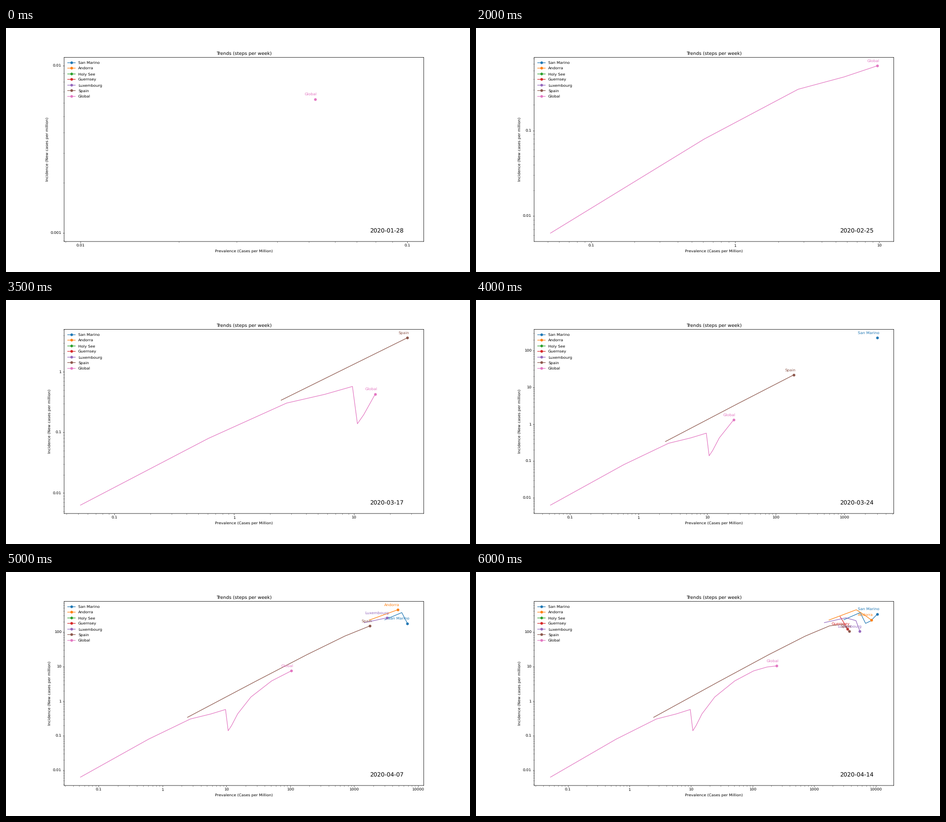
Write a matplotlib script that moves like this. It is 1028 by 544 pixels and loops after 10 s.

```python
import numpy as np
import matplotlib.pyplot as plt
from matplotlib.animation import FuncAnimation
from matplotlib.lines import Line2D
from matplotlib.ticker import FuncFormatter, LogLocator, NullFormatter

W, H, DPI = 1028, 544, 72 * 6 / 7
STEPS, FRAMES, INTERVAL = 13, 20, 500

plt.rcParams.update({"font.family": "DejaVu Sans", "font.size": 10,
                     "text.hinting": "none", "axes.linewidth": 1})


def bell(first, mid, width, peak):
    """Weekly cases of an outbreak that swells and fades."""
    week = np.arange(first, STEPS)
    return peak * np.exp(-((week - mid) / width) ** 2 / 2)


def surge(first, mid, rate, base, cap):
    """Weekly cases that climb from a base level to a plateau."""
    week = np.arange(first, STEPS)
    return base + cap / (1 + np.exp(rate * (mid - week)))


# name: (cases per million so far, new cases in each week up to the last)
OUTBREAKS = {
    "San Marino": (1438, [1582, 2557, 1246, 1470, 2320]),
    "Andorra": (180, [1554, 3085, 2050, 1568]),
    "Holy See": (0, []),
    "Guernsey": (690, [1946, 860]),
    "Luxembourg": (150, bell(9, 10.13, 1.4, 1814)),
    "Spain": (0.09, bell(6, 10.695, 1.33, 1208)),
    "Global": (0.008, np.r_[0.0442, 0.556, 2.13, 2.97, 4.01,
                            surge(5, 9.42, 1.45, 0.85, 74)]),
}

# The tiny surplus keeps the canvas from being truncated by one pixel
fig = plt.figure(figsize=((W + 1e-4) / DPI, (H + 1e-4) / DPI), dpi=DPI,
                 facecolor="white")
ax = fig.add_axes([0.1253, 0.125, 0.775, 0.7545])
ax.set(xscale="log", yscale="log", title="Trends (steps per week)",
       xlabel="Prevalence (Cases per Million)",
       ylabel="Incidence (New cases per million)")
for spine in ax.spines.values():
    spine.set_snap(False)
for axis in (ax.xaxis, ax.yaxis):
    axis.set_major_locator(LogLocator(numticks=50))
    axis.set_minor_locator(LogLocator(subs=np.arange(2, 10), numticks=50))
    axis.set_major_formatter(FuncFormatter(lambda v, _: f"{v:g}"))
    axis.set_minor_formatter(NullFormatter())

date = ax.text(0.85, 0.05, "", transform=ax.transAxes, fontsize=15)


class Track:
    """One place: its path, its label and its legend row."""

    def __init__(self, row, name, base, gains):
        self.start = STEPS - len(gains)
        self.x = base + np.cumsum(gains)
        self.y = np.array(gains) / 7  # daily mean of the week
        color = f"C{row}"
        self.line, = ax.plot([], [], color=color, marker="o", markevery=[-1])
        self.label = ax.annotate(name, (1, 1), xytext=(5, 10), ha="right",
                                 textcoords="offset points", color=color,
                                 annotation_clip=False)
        self.draw_key(row, name, color)

    @staticmethod
    def draw_key(row, name, color):
        y = 1 - (76.6 + 12.58 * row) / H
        xs = np.array([136.2, 144.8, 153.4]) / W
        fig.add_artist(Line2D(xs, [y] * 3, color=color, marker="o",
                              markevery=[1], transform=fig.transFigure))
        fig.text(160 / W, y - 3.2 / H, name)

    def show(self, step):
        n = max(step - self.start + 1, 0)
        x, y = self.x[:n], self.y[:n]
        self.line.set_data(x, y)
        for artist in (self.line, self.label):
            artist.set_visible(n > 0)
        if n:
            self.label.xy = x[-1], y[-1]
        return x, y


tracks = [Track(row, name, *data)
          for row, (name, data) in enumerate(OUTBREAKS.items())]


def limits(parts):
    """Log limits with a 5 % margin; a lone value spans its whole decade."""
    logs = np.log10(np.concatenate(parts))
    lo, hi = logs.min(), logs.max()
    if lo == hi:
        lo, hi = np.floor(lo), np.ceil(hi)
    pad = 0.05 * (hi - lo)
    return 10 ** (lo - pad), 10 ** (hi + pad)


def update(i):
    step = min(i, STEPS - 1)
    xs, ys = zip(*(track.show(step) for track in tracks))
    ax.set_xlim(limits(xs))
    ax.set_ylim(limits(ys))
    # The last step keeps the date of the week before
    date.set_text(str(np.datetime64("2020-01-28") + 7 * min(step, STEPS - 2)))
    return []


anim = FuncAnimation(fig, update, frames=FRAMES, interval=INTERVAL,
                     repeat=True, repeat_delay=0, blit=False)
plt.show()
```
